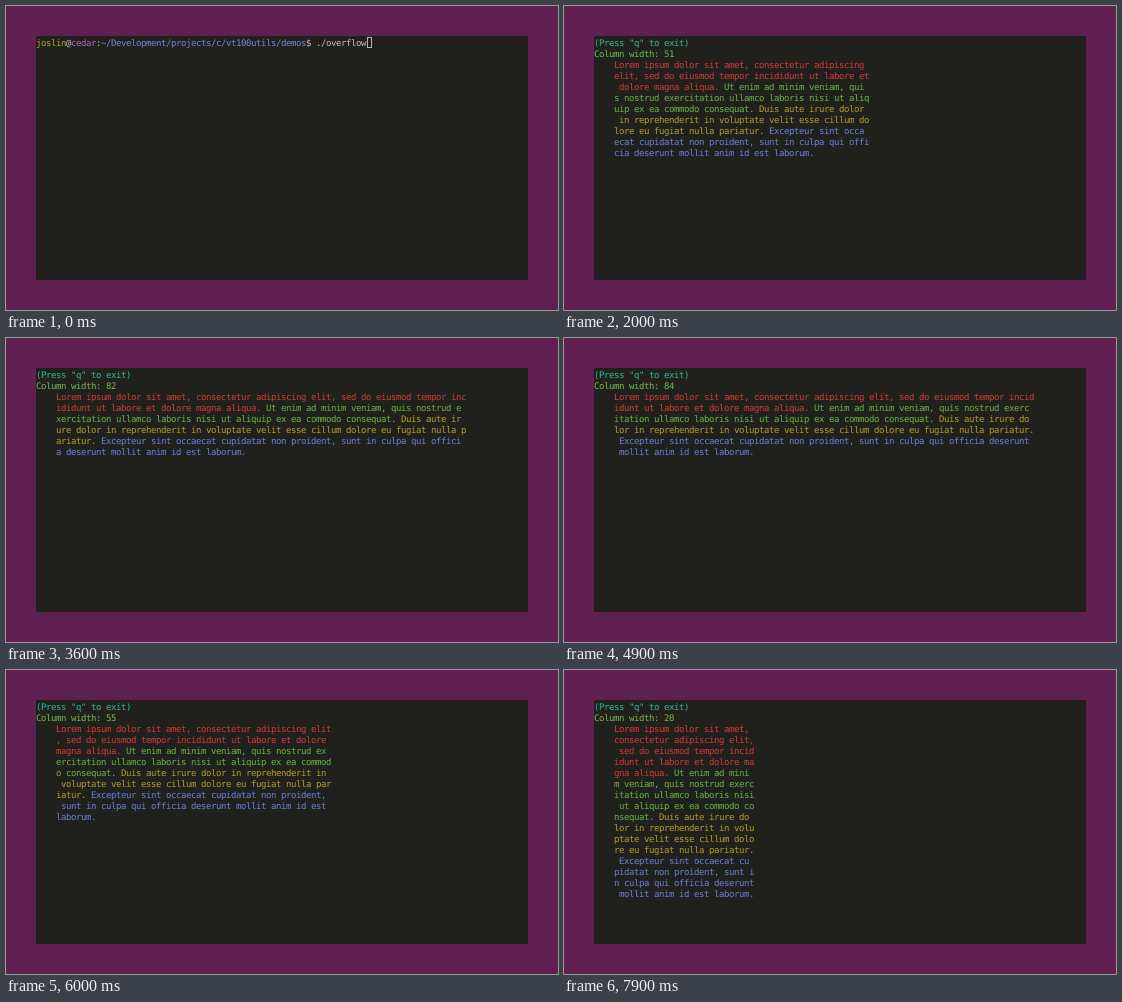
Animation of 552 by 304 pixels, one loop 8000 ms. Source, as an HTML page:

```html
<!DOCTYPE html>
<html lang="en">
<head>
<meta charset="utf-8">
<title>Column overflow demo</title>
<style>
  html, body { margin: 0; width: 100%; height: 100%; overflow: hidden; background: #602152; }
  #term {
    position: absolute; left: 30px; top: 30px; width: 492px; height: 244px;
    background: #20211c; overflow: hidden;
  }
  #screen {
    position: absolute; left: 0; top: 3px; margin: 0;
    font: 9px/11px "DejaVu Sans Mono", "Liberation Mono", monospace;
    letter-spacing: calc(5px - 1ch);
    text-rendering: geometricPrecision;
    white-space: pre;
  }
  #cursor {
    position: absolute; left: 331px; top: 1px; width: 5px; height: 11px;
    box-sizing: border-box; border: 1px solid #b9b7a4;
  }
  .user { color: #b3a82c; }
  .host { color: #b565bd; }
  .path { color: #7088e6; }
  .plain { color: #c8bcc6; }
  .hint { color: #35b898; }
  .label { color: #74bb4e; }
  .red { color: #d63a38; }
  .green { color: #6cb545; }
  .yellow { color: #b39f2e; }
  .blue { color: #6c80dc; }
</style>
</head>
<body>
<div id="term"><pre id="screen"></pre><div id="cursor"></div></div>
<script>
const LOOP = 8000, STEP = 100, CLEAR = 900, START = 1100;
const screenEl = document.getElementById('screen');
const cursorEl = document.getElementById('cursor');

const sentences = [
  ['red', 'Lorem ipsum dolor sit amet, consectetur adipiscing elit, sed do eiusmod tempor incididunt ut labore et dolore magna aliqua. '],
  ['green', 'Ut enim ad minim veniam, quis nostrud exercitation ullamco laboris nisi ut aliquip ex ea commodo consequat. '],
  ['yellow', 'Duis aute irure dolor in reprehenderit in voluptate velit esse cillum dolore eu fugiat nulla pariatur. '],
  ['blue', 'Excepteur sint occaecat cupidatat non proident, sunt in culpa qui officia deserunt mollit anim id est laborum.']
];

// [time in ms, column width]
const widths = [
  [1100, 37], [1900, 50], [2000, 51], [2800, 64], [2900, 67], [3700, 84],
  [4150, 85], [4500, 84], [4900, 84], [5500, 68], [6000, 55], [6400, 45],
  [6700, 38], [7300, 29], [7600, 28], [8000, 28]
];

const span = (cls, text) => `<span class="${cls}">${text}</span>`;

const prompt = span('user', 'joslin') + span('plain', '@') + span('host', 'cedar') +
  span('plain', ':') + span('path', '~/Development/projects/c/vt100utils/demos') +
  span('plain', '$ ./overflow');

function widthAt(t) {
  const i = widths.findIndex(([end]) => end > t);
  const [t0, w0] = widths[i - 1], [t1, w1] = widths[i];
  return Math.round(w0 + (w1 - w0) * (t - t0) / (t1 - t0));
}

// Each colour change takes one invisible cell; the first falls before column 0.
function column(width) {
  let n = -1;
  const wrap = text => ['', ...text].map(c => (n++ % width ? '' : '\n    ') + c).join('');
  return sentences.map(([cls, text]) => span(cls, wrap(text))).join('');
}

function render(t) {
  if (t < CLEAR) return prompt;
  if (t < START) return '';
  const width = widthAt(t);
  return span('hint', '(Press "q" to exit)') + '\n' +
    span('label', 'Column width: ' + width) + column(width);
}

let shown = -1;
function tick() {
  const t = Math.floor(performance.now() % LOOP / STEP) * STEP;
  if (t !== shown) {
    shown = t;
    screenEl.innerHTML = render(t);
    cursorEl.hidden = t >= CLEAR;
  }
  requestAnimationFrame(tick);
}
tick();
</script>
</body>
</html>
```
